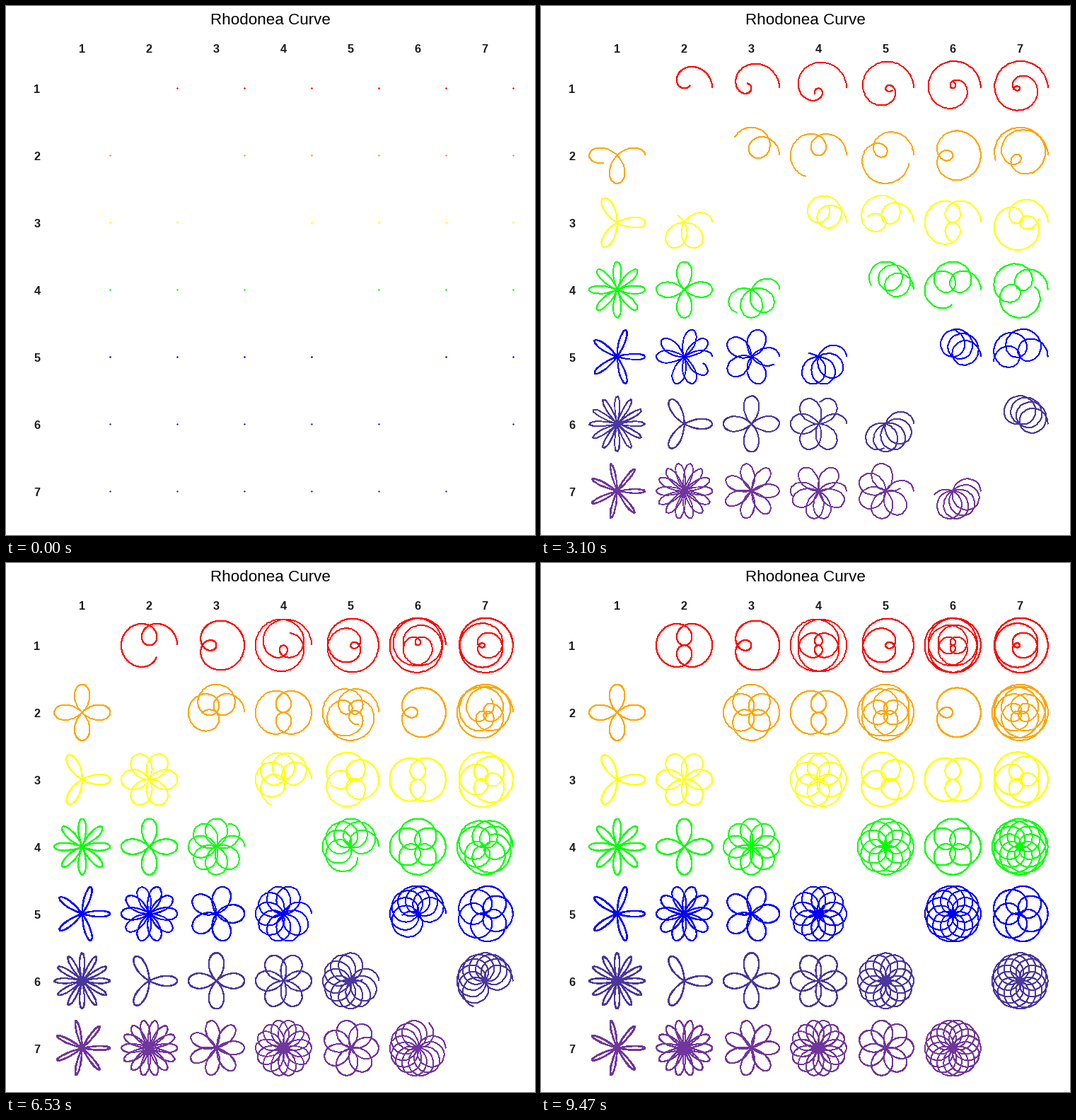
A matplotlib script for the animation above (10000 ms loop, 748 px wide and 748 px high).

```python
import numpy as np
import matplotlib.pyplot as plt
from matplotlib.animation import FuncAnimation

SIZE, DPI = 748, 100
PX = 72 / DPI                      # one pixel in points
FRAMES, LOOP_MS = 300, 10000
PAUSE, STEPS = 15, 269             # held frames at each end, growth steps
SAMPLES = 500
PEN = 0.7                          # fills two pixels when not antialiased
LEFT, TOP, PITCH, RADIUS = 107.7, 116.4, 94.9, 39.6
COLORS = ["#ff0000", "#ffa500", "#ffff00", "#00ff00",
          "#0000ff", "#4b369d", "#70369d"]

plt.rcParams["font.family"] = ["Liberation Sans"]
plt.rcParams["path.simplify"] = False

fig = plt.figure(figsize=(SIZE / DPI, SIZE / DPI), dpi=DPI, facecolor="white")
ax = fig.add_axes([0, 0, 1, 1])
ax.set_xlim(0, SIZE)
ax.set_ylim(SIZE, 0)
ax.axis("off")


def label(x, y, text, size, **style):
    ax.text(x, y, text, fontsize=size * PX, ha="center", va="baseline", **style)


def rose(n, d, s):
    """Points of r = cos(n/d * theta) on whole pixels."""
    theta = max(n, d) * s
    r = RADIUS * np.cos(n / d * theta)
    x = LEFT + PITCH * (d - 1) + r * np.cos(theta)
    y = TOP + PITCH * (n - 1) - r * np.sin(theta)
    return np.floor(x + 0.5), np.floor(y + 0.5)


def plus(x, y):
    """Three-pixel cross over the pixel at (x, y)."""
    return ([x - 0.9, x + 1.9, np.nan, x + 0.5, x + 0.5],
            [y + 0.5, y + 0.5, np.nan, y - 0.9, y + 1.9])


label(373.7, 26, "Rhodonea Curve", 22.4, color="black")
for i in range(7):
    bold = dict(weight="bold", color="#1a1a1a")
    label(LEFT - 0.2 + PITCH * i, 66, str(i + 1), 16.3, **bold)
    label(44, TOP + 7 + PITCH * i, str(i + 1), 16.3, **bold)

curves = {}
for n in range(1, 8):
    for d in range(1, 8):
        if n != d:
            curves[n, d], = ax.plot([], [], color=COLORS[n - 1], lw=PEN * PX,
                                    antialiased=False, snap=False,
                                    solid_capstyle="butt",
                                    solid_joinstyle="round")

grid = np.linspace(0, 2 * np.pi, SAMPLES)


def draw(frame):
    step = min(max(frame - PAUSE, 0), STEPS)
    end = 2 * np.pi * step / STEPS
    s = np.append(grid[grid < end], end)
    for (n, d), line in curves.items():
        x, y = rose(n, d, s)
        if step == 0:
            x, y = plus(x[0], y[0])
        line.set_data(x, y)
    return list(curves.values())


anim = FuncAnimation(fig, draw, frames=FRAMES, interval=LOOP_MS / FRAMES,
                     init_func=lambda: draw(0), repeat=True, repeat_delay=0)
plt.show()
```
